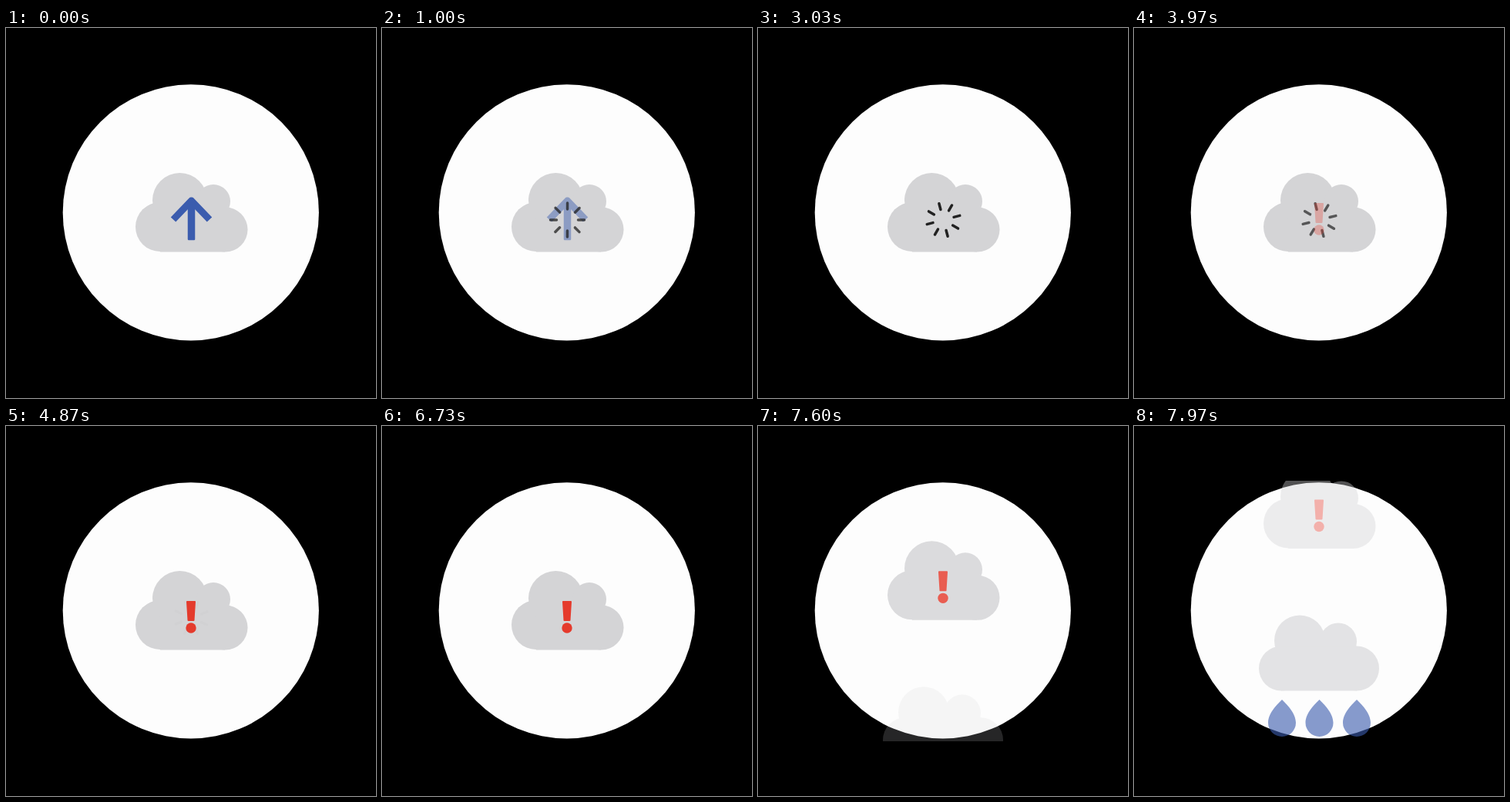
Animation of 480x480 px, one loop 8000 ms. Source, as an HTML page:

```html
<!DOCTYPE html>
<html>
<head>
<meta charset="utf-8">
<style>
  html, body { margin: 0; height: 100%; overflow: hidden; background: #000; }
  svg { display: block; width: 100vw; height: 100vh; }
</style>
</head>
<body>
<svg viewBox="0 0 480 480">
  <clipPath id="panel"><rect x="71" y="71" width="338" height="338"/></clipPath>
  <circle cx="239.8" cy="239.4" r="166.1" fill="#fdfdfd"/>
  <g clip-path="url(#panel)">
    <g id="upload">
      <g fill="#d4d4d6">
        <circle cx="200" cy="258" r="32"/>
        <circle cx="225.5" cy="223.5" r="35.5"/>
        <circle cx="269" cy="225" r="22"/>
        <circle cx="284.5" cy="261.5" r="29"/>
        <path d="M200 226H284V290.5H200Z"/>
      </g>
      <g id="arrow" fill="none" stroke="#3b5cae" stroke-width="9" stroke-linejoin="round">
        <path d="M217 248.5L240.5 224L264 248.5"/>
        <rect x="237" y="228" width="7" height="46" fill="#3b5cae" stroke-width="2.5"/>
      </g>
      <g id="spinner" stroke="#222" stroke-width="3.5" stroke-linecap="round"></g>
      <g id="alert" fill="#e53a2c">
        <path d="M235 228H245L243.5 252H236.5Z" stroke="#e53a2c" stroke-width="2" stroke-linejoin="round"/>
        <circle cx="240" cy="262" r="6.7"/>
      </g>
    </g>
    <g id="rain">
      <g fill="#d4d4d6">
        <circle cx="191" cy="446" r="29"/>
        <circle cx="215" cy="410" r="33"/>
        <circle cx="265" cy="411" r="24"/>
        <circle cx="289" cy="446" r="29"/>
        <path d="M191 417H289V475H191Z"/>
      </g>
      <g id="drops" fill="#3b5cae"></g>
    </g>
  </g>
</svg>
<script>
const $ = id => document.getElementById(id);
const LOOP = 8000, RISE = 215;

$('spinner').innerHTML = Array.from({ length: 8 }, (_, i) =>
  `<path d="M0-14V-22" transform="rotate(${i * 45})"/>`).join('');
$('drops').innerHTML = [192, 240.5, 289].map(x =>
  `<path transform="translate(${x} 515.5)"
    d="M0-29C5-24 18-12 18 1A18 18 0 0 1-18 1C-18-12-5-24 0-29Z"/>`).join('');

// Cubic ease in and out
const ease = (t, start, length) => {
  const x = Math.min(1, Math.max(0, (t - start) / length));
  return x < 0.5 ? 4 * x ** 3 : 1 - 4 * (1 - x) ** 3;
};
const set = (id, opacity, transform = '') => {
  $(id).setAttribute('opacity', opacity);
  $(id).setAttribute('transform', transform);
};

function draw(now) {
  const t = now % LOOP;
  const warn = ease(t, 3130, 2000);
  const swap = ease(t, 6890, 2000);
  const move = `translate(0 ${-RISE * swap})`;
  set('arrow', 1 - ease(t, 0, 1950));
  set('spinner', ease(t, 0, 1650) * (1 - warn),
    `translate(240.5 249) rotate(${(t - 1000) * 390 / 2030})`);
  set('alert', warn);
  set('upload', 1 - swap, move);
  set('rain', swap, move);
  requestAnimationFrame(draw);
}
requestAnimationFrame(draw);
</script>
</body>
</html>
```
